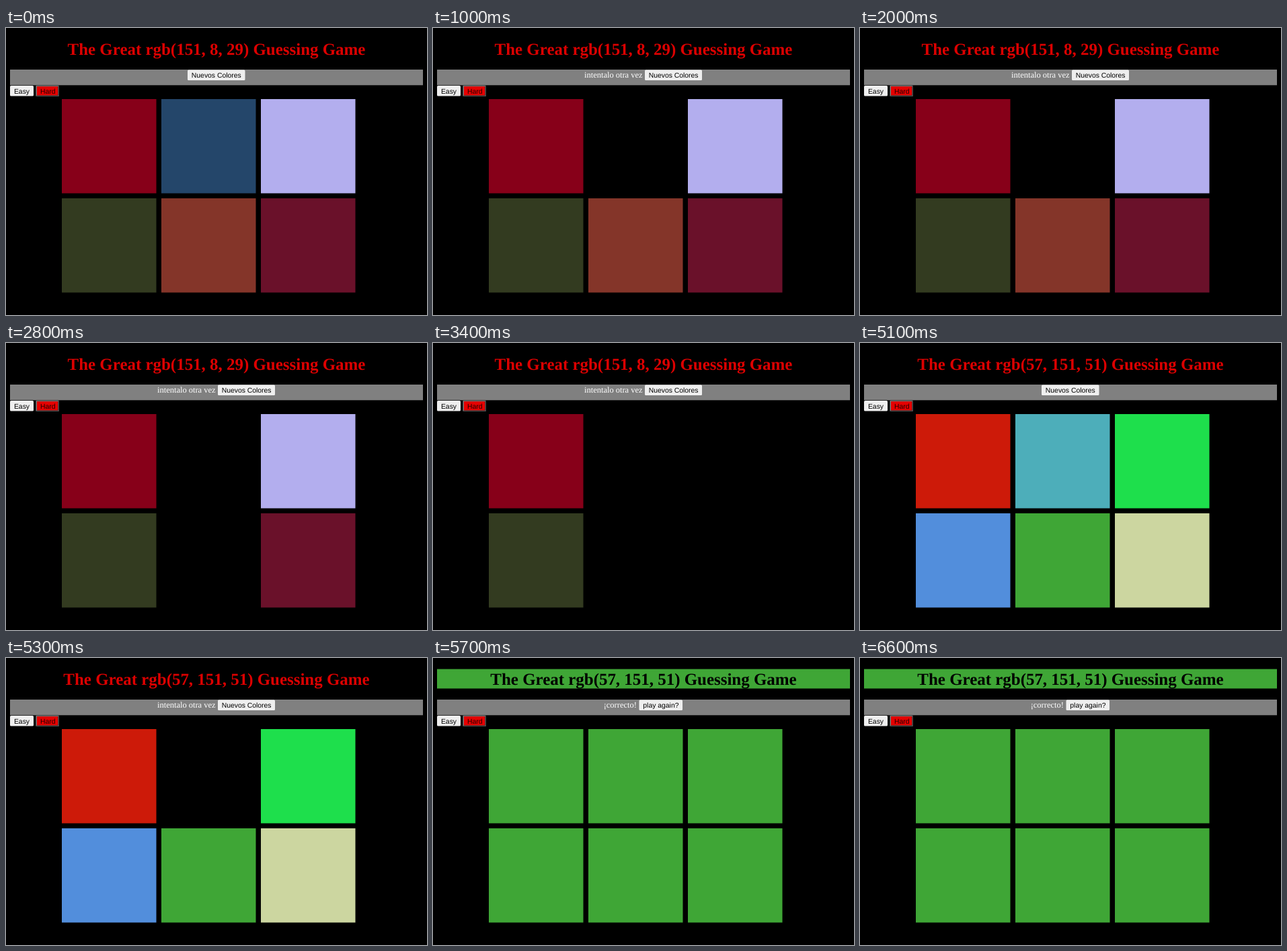
Write an HTML page that moves like this. It is 626 px wide and 428 px high and loops after 8 s.

```html
<!DOCTYPE html>
<html lang="es">
<head>
<meta charset="utf-8">
<title>Guessing Game</title>
<style>
  html, body { margin: 0; width: 100%; height: 100%; overflow: hidden; background: #000; }
  svg { display: block; width: 626px; height: 428px; text-rendering: geometricPrecision; }

  :root { --win1: #87001a; --win2: #3fa636; --ink: #dc0000; }

  .title { font: bold 24.95px "Liberation Serif", serif; text-anchor: middle; }
  .msg { font: 12.48px "Liberation Serif", serif; fill: #fff; }
  .label { font: 10.4px "Liberation Sans", sans-serif; text-anchor: middle; }
  .face { fill: #efefef; }

  .bar, .title, .tile, .first, .second, .idle, .miss, .win {
    animation: 8s step-end infinite;
  }
  .bar { animation-name: bar; }
  .title { animation-name: ink; }
  .first { animation-name: first; }
  .second { animation-name: second; }
  .idle { animation-name: idle; }
  .miss { animation-name: miss; }
  .win { animation-name: win; }
  .tile { animation-name: rounds, var(--gone, none); }

  /* Title bar and tiles take the winning colour at the end of each round. */
  @keyframes bar {
    0%, 63.75% { fill: #000; }
    51.25% { fill: var(--win1); }
    71.25%, 100% { fill: var(--win2); }
  }
  @keyframes ink {
    0%, 63.75% { fill: var(--ink); }
    51.25%, 71.25%, 100% { fill: #000; }
  }
  @keyframes rounds {
    0% { fill: var(--a); }
    51.25% { fill: var(--win1); }
    63.75% { fill: var(--b); }
    71.25%, 100% { fill: var(--win2); }
  }

  @keyframes first { 0% { opacity: 1; } 63.75%, 100% { opacity: 0; } }
  @keyframes second { 0% { opacity: 0; } 63.75%, 100% { opacity: 1; } }

  @keyframes idle {
    0%, 63.75% { opacity: 1; }
    11.25%, 66.25%, 100% { opacity: 0; }
  }
  @keyframes miss {
    0%, 51.25%, 71.25%, 100% { opacity: 0; }
    11.25%, 66.25% { opacity: 1; }
  }
  @keyframes win {
    0%, 63.75% { opacity: 0; }
    51.25%, 71.25%, 100% { opacity: 1; }
  }

  /* Wrong guesses */
  @keyframes gone-blue {
    0%, 51.25%, 71.25%, 100% { opacity: 1; }
    11.25%, 66.25% { opacity: 0; }
  }
  @keyframes gone-brown { 0%, 51.25%, 100% { opacity: 1; } 35% { opacity: 0; } }
  @keyframes gone-maroon { 0%, 51.25%, 100% { opacity: 1; } 37.5% { opacity: 0; } }
  @keyframes gone-lilac { 0%, 51.25%, 100% { opacity: 1; } 42.5% { opacity: 0; } }
</style>
</head>
<body>
<svg viewBox="0 0 626 428">
  <rect width="626" height="428"/>

  <rect class="bar" x="6" y="16.5" width="614" height="29"/>
  <g class="first"><text class="title" x="313" y="39.5">The Great rgb(151, 8, 29) Guessing Game</text></g>
  <g class="second"><text class="title" x="313" y="39.5">The Great rgb(57, 151, 51) Guessing Game</text></g>

  <rect x="6" y="62" width="614" height="23.3" fill="#808080"/>
  <g class="idle">
    <rect class="face" x="270" y="62.5" width="85.5" height="15.5" rx="1.5"/>
    <text class="label" x="312.8" y="74">Nuevos Colores</text>
  </g>
  <g class="miss">
    <text class="msg" x="225" y="74">intentalo otra vez</text>
    <rect class="face" x="315" y="62.5" width="85" height="15.5" rx="1.5"/>
    <text class="label" x="357.6" y="74">Nuevos Colores</text>
  </g>
  <g class="win">
    <text class="msg" x="253.7" y="74">¡correcto!</text>
    <rect class="face" x="306.5" y="62.5" width="64.5" height="15.5" rx="1.5"/>
    <text class="label" x="338.9" y="74">play again?</text>
  </g>

  <rect class="face" x="6" y="86" width="35" height="15.5" rx="1.5"/>
  <text class="label" x="23.5" y="97.5">Easy</text>
  <path d="M44.5 102V85.7H78.8L77.2 87.2H46V100.4Z" fill="#808080"/>
  <path d="M78.8 85.7V102H44.5L46 100.4H77.2V87.2Z" fill="#555"/>
  <rect x="46" y="87.2" width="31.2" height="13.2" fill="#e60000"/>
  <text class="label" x="62.2" y="97.5" fill="#200">Hard</text>

  <g>
    <rect class="tile" x="83" y="106" width="140.5" height="140.5" style="--a:#870019;--b:#cd1a09"/>
    <rect class="tile" x="231" y="106" width="140.5" height="140.5" style="--a:#24466a;--b:#4daeba;--gone:gone-blue"/>
    <rect class="tile" x="379" y="106" width="140.5" height="140.5" style="--a:#b3aeee;--b:#1edf4c;--gone:gone-lilac"/>
    <rect class="tile" x="83" y="254" width="140.5" height="140.5" style="--a:#333b20;--b:#528edc"/>
    <rect class="tile" x="231" y="254" width="140.5" height="140.5" style="--a:#843529;--b:#3fa636;--gone:gone-brown"/>
    <rect class="tile" x="379" y="254" width="140.5" height="140.5" style="--a:#6a112a;--b:#ccd6a0;--gone:gone-maroon"/>
  </g>
</svg>
</body>
</html>
```
